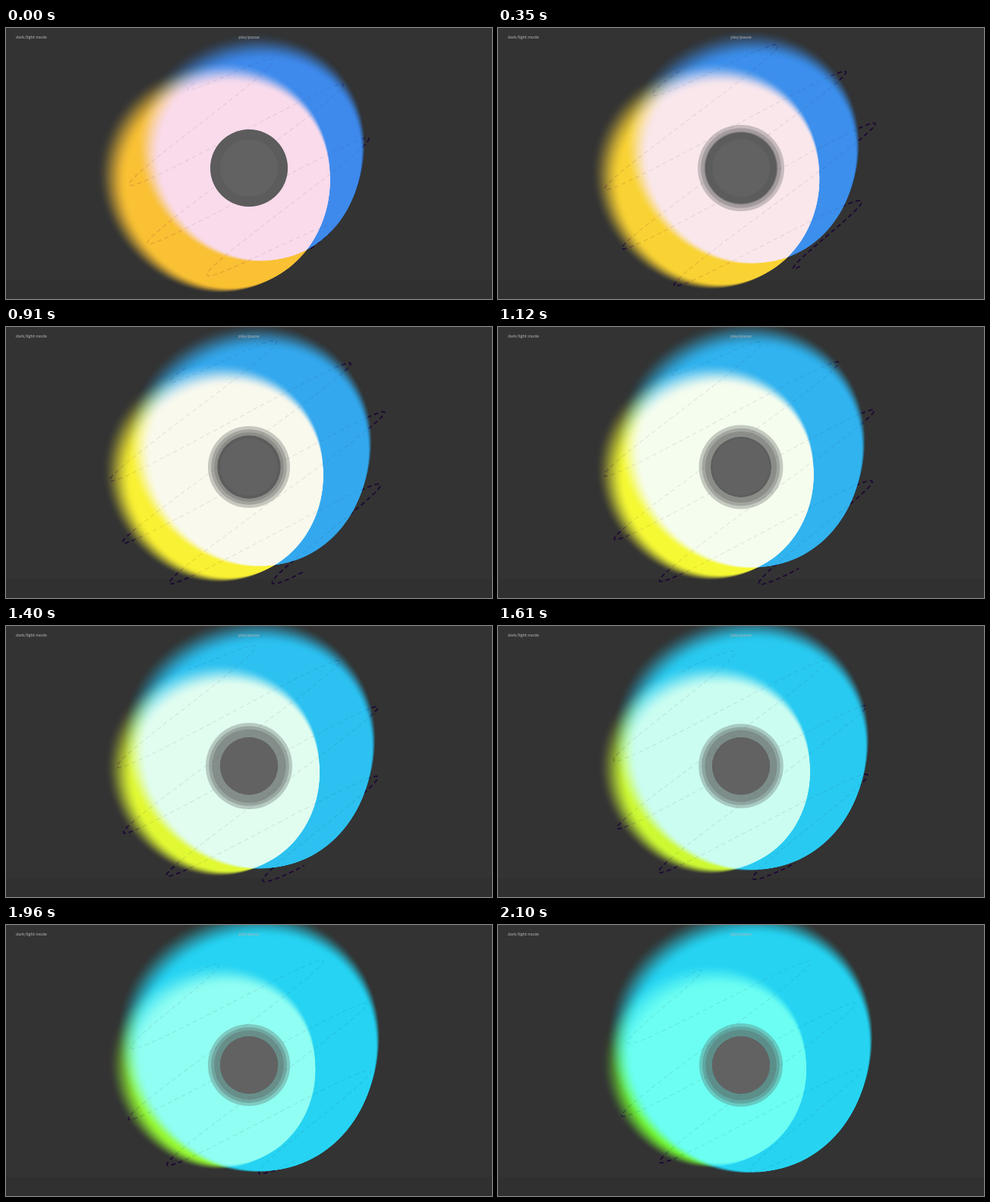
An HTML page with a canvas that plays this animation: 640 by 358 pixels, repeating every 2.17 s.

```html
<!DOCTYPE html>
<html lang="en">
<head>
<meta charset="utf-8">
<title>Glowing iris</title>
<style>
  html, body { margin: 0; width: 100%; height: 100%; overflow: hidden; background: #333; }
  canvas { position: absolute; left: 0; top: 0; }
  span {
    position: absolute; top: 8px; white-space: nowrap;
    font: 5.8px/7px Lato, sans-serif; color: #b4b4b4;
  }
  .mode { left: 13px; }
  .play { left: 320px; transform: translateX(-50%); }
</style>
</head>
<body>
<canvas id="stage" width="640" height="358"></canvas>
<span class="mode">dark/light mode</span>
<span class="play">play/pause</span>
<script>
const W = 640, H = 358, CX = 320, CY = 185, TAU = 2 * Math.PI;
const LOOP = 2170, STEP = 70, LAYERS = 22;
const ctx = document.getElementById('stage').getContext('2d');
const scratch = document.createElement('canvas');
scratch.width = W;
scratch.height = H;
const sctx = scratch.getContext('2d');

const mix = (a, b, k) => a + (b - a) * k;
const ease = k => k * k * (3 - 2 * k);

// Each blob is a stack of translucent copies, smeared towards the upper left.
function coolBlob(p) {
  const k = ease(p);
  return {
    x: mix(337, 334, p), y: mix(173, 168, p), r: mix(132, 156, p),
    spread: 20, smearX: -14, smearY: -18,
    color: `rgb(${mix(62, 38, k)}, ${mix(138, 212, k)}, ${mix(236, 242, k)})`
  };
}

function warmBlob(p) {
  return {
    x: mix(294, 291, p), y: mix(207, 196, p), r: mix(134, 116, p),
    spread: 20, smearX: -20, smearY: -12,
    color: `hsl(${43 + 33 * p + 24 * p ** 6}, 100%, 48.5%)`
  };
}

// Circle with three slight lobes, flattest at the lower left.
function traceBlob(c, x, y, r) {
  c.beginPath();
  for (let a = 0; a < TAU; a += TAU / 120) {
    const d = r * (1 + .015 * Math.cos(3 * a - TAU * 5 / 8));
    c.lineTo(x + d * Math.cos(a), y + d * Math.sin(a));
  }
  c.closePath();
}

function drawBlob(b, mode) {
  sctx.clearRect(0, 0, W, H);
  sctx.fillStyle = b.color;
  let covered = 0;
  for (let k = 1; k <= LAYERS; k++) {
    const cover = ease(k / LAYERS), out = 1 - k / LAYERS;
    sctx.globalAlpha = (cover - covered) / (1 - covered);
    covered = cover;
    traceBlob(sctx, b.x + b.smearX * out, b.y + b.smearY * out, b.r + b.spread * out);
    sctx.fill();
  }
  ctx.globalCompositeOperation = mode;
  ctx.drawImage(scratch, 0, 0);
  ctx.globalCompositeOperation = 'source-over';
}

// One dashed wave inside a breathing ellipse, drifting across its tilted axis.
function drawWave(p, alpha, width) {
  const reach = 167 + 5 * p + 26 * Math.sin(Math.PI * p ** .65);
  const pitch = 79, drift = -27 - 40 * p, half = reach * .8;
  ctx.save();
  ctx.translate(CX, CY);
  ctx.rotate(-32.4 * Math.PI / 180);
  ctx.beginPath();
  for (let v = -half; v <= half; v += .5) {
    const u = reach * Math.sqrt(1 - (v / half) ** 2) * Math.cos((v - drift) / pitch * TAU);
    ctx.lineTo(u, v);
  }
  ctx.setLineDash([6, 4]);
  ctx.lineWidth = width;
  ctx.strokeStyle = `rgba(29, 8, 52, ${alpha})`;
  ctx.stroke();
  ctx.restore();
}

function disc(r, color) {
  ctx.fillStyle = color;
  ctx.beginPath();
  ctx.arc(CX, CY, r, 0, TAU);
  ctx.fill();
}

function drawPupil(p) {
  const pulse = 55.5 + 1.5 * Math.cos(TAU * (p - .17) / .49);
  const outer = Math.min(51 + 36 * p, pulse);
  for (let i = 0; i < 3; i++) disc(outer - 4.2 * i, 'rgba(85, 85, 85, .3)');
  disc(38 + 13 * Math.max(0, 1 - 1.5 * p) ** 1.2, '#5c5c5c');
  disc(38, '#626262');
}

function draw(p) {
  ctx.fillStyle = '#333';
  ctx.fillRect(0, 0, W, H);
  ctx.fillStyle = '#303030';
  ctx.fillRect(0, 333, W, 25);
  drawWave(p, 1, 1.8);
  drawBlob(coolBlob(p), 'source-over');
  drawBlob(warmBlob(p), 'screen');
  drawWave(p, .1, 1);
  drawPupil(p);
}

const start = performance.now();
let shown = -1;
function tick() {
  const t = Math.floor((performance.now() - start) % LOOP / STEP) * STEP;
  if (t !== shown) {
    shown = t;
    draw(t / (LOOP - STEP));
  }
  requestAnimationFrame(tick);
}
tick();
</script>
</body>
</html>
```
